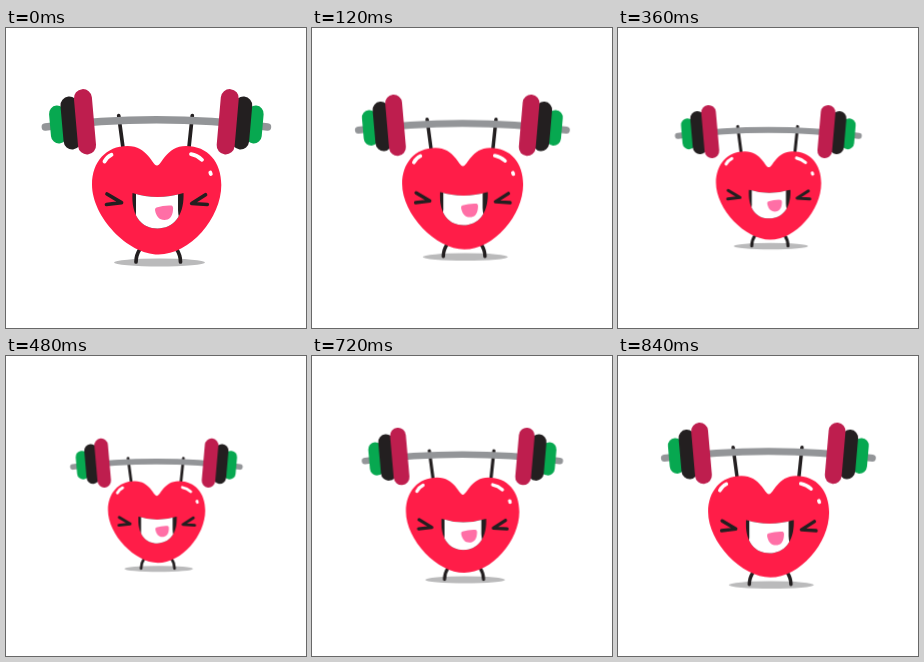
Recreate the animation shown at these times as an HTML page without scripts. Size 300x300 px, loop 960 ms.

```html
<!DOCTYPE html>
<html lang="en">
<head>
<meta charset="utf-8">
<title>Heart lifting a barbell</title>
<style>
  html, body { margin: 0; width: 100%; height: 100%; overflow: hidden; background: #fff; }
  svg { display: block; width: 100%; height: 100%; }
  .line { fill: none; stroke: #231f20; stroke-width: 3.7; stroke-linecap: round; stroke-linejoin: round; }
  .shine { fill: none; stroke: #fff; stroke-width: 3.8; stroke-linecap: round; }
  .pulse {
    transform-origin: 150.3px 147px;
    animation: pulse 960ms step-end infinite;
  }
  /* even shrink and grow, held for one eighth of the loop each */
  @keyframes pulse {
    0%, 100% { transform: scale(1); }
    12.5%, 87.5% { transform: scale(.936); }
    25%, 75% { transform: scale(.877); }
    37.5%, 62.5% { transform: scale(.814); }
    50% { transform: scale(.752); }
  }
</style>
</head>
<body>
<svg viewBox="0 0 300 300">
  <defs>
    <g id="plates">
      <rect x="44" y="77.5" width="16" height="38" rx="8" fill="#07a850" transform="rotate(-5 52 96.5)"/>
      <rect x="56" y="68.5" width="17.5" height="53" rx="8.7" fill="#231f20" transform="rotate(-5 64.7 95)"/>
      <rect x="70" y="61" width="18" height="65.5" rx="9" fill="#be1e4e" transform="rotate(-5 79 94)"/>
    </g>
    <clipPath id="mouth">
      <path d="M126.5 165 Q151 173 177.500 165 C178.500 187 168 200.500 151.500 200.500 C135 200.500 125 187 126.500 165Z"/>
    </clipPath>
  </defs>

  <g class="pulse">
    <ellipse cx="153.5" cy="234.5" rx="45.5" ry="4" fill="#bababb"/>
    <path class="line" d="M134 221 Q130 227 130 234 M170.5 221 Q174.500 227 174.500 234"/>

    <path class="line" d="M112.700 87.500 L117.300 122 M186.300 87.500 L182.700 122"/>
    <path d="M39.300 99 Q150.500 84.500 261.500 99" fill="none" stroke="#939598" stroke-width="7.400" stroke-linecap="round"/>
    <use href="#plates"/>
    <use href="#plates" transform="translate(300.7 0) scale(-1 1)"/>

    <path fill="#ff1d48" d="M151 137.500 C146.500 138 142 118 121.500 118 C100 118 86 134 86 156.500 C86 189 122 226.500 152.500 226.500 C184 226.500 215.300 190 215.300 157 C215.300 134 202 118 180 118 C160 118 155.500 138 151 137.500Z"/>
    <path class="shine" d="M98.500 133.500 Q101 128.800 105.500 126.700 M185 126.200 Q191 127.300 196 131.800 M204.300 144.500 L204.800 146"/>

    <path class="line" d="M101 166 L115.500 174.700 L100.500 176.500 M199.500 166.700 L185.700 175.500 L201.300 176.500"/>
    <g clip-path="url(#mouth)">
      <rect x="120" y="160" width="62" height="44" fill="#231f20"/>
      <path fill="#fff" d="M130 160 H172 V182 Q172 190 178 204 H124 Q130.500 190 130 182Z"/>
      <path fill="#ff6fa6" d="M150.500 179.500 Q158 177 165.500 177.500 Q167.500 178 167 182 C166.500 189 163 192 158.500 192 C153 192 150 188 149 182 Q148.800 180 150.500 179.500Z"/>
    </g>
  </g>
</svg>
</body>
</html>
```
